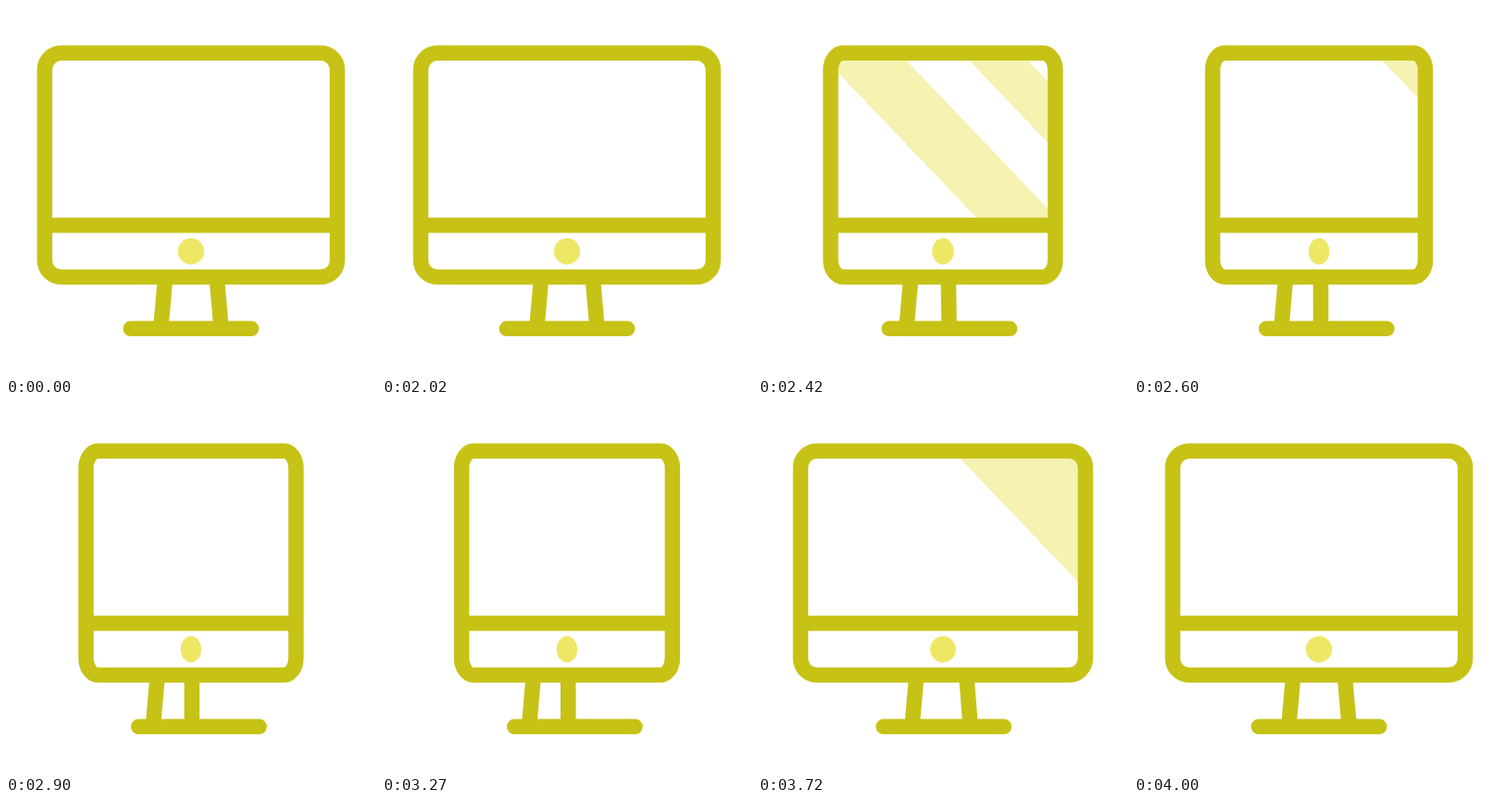
These frames come from a looping animation (400x400 px, 4020 ms). An HTML page without scripts:

```html
<!DOCTYPE html>
<html lang="en">
<head>
<meta charset="utf-8">
<title>Turning monitor</title>
<style>
  /* 0 = facing front, 1 = fully turned */
  @property --turn {
    syntax: "<number>";
    inherits: true;
    initial-value: 0;
  }

  html, body {
    margin: 0;
    height: 100%;
    overflow: hidden;
    background: #fff;
  }

  svg {
    display: block;
    width: 100%;
    height: 100%;
    animation: turn 4020ms infinite;
  }

  .line {
    fill: none;
    stroke: #c7c216;
    stroke-width: 16.5;
  }

  .panel {
    x: calc(41.8px + var(--turn) * 44.7px);
    width: calc(316.4px - var(--turn) * 89.4px);
    rx: calc(18px - var(--turn) * 5px);
    ry: 18px;
  }

  .bar {
    x: calc(41.8px + var(--turn) * 44.7px);
    width: calc(316.4px - var(--turn) * 89.4px);
    fill: #c7c216;
  }

  .button {
    rx: calc(14.2px - var(--turn) * 3px);
    fill: #eee766;
  }

  .left-leg { transform: translateX(calc(var(--turn) * -8.4px)); }
  .right-leg { transform: translateX(calc(var(--turn) * -1.2px)) skewX(calc(var(--turn) * -5deg)); }
  .base { transform: translateX(calc(var(--turn) * 8.5px)); }

  .shine { fill: #f5f2b2; }
  .pair { animation: sweep-pair 4020ms linear infinite; }
  .wide { animation: sweep-wide 4020ms linear infinite; }

  @keyframes turn {
    0% { --turn: 0; }
    49.75% { --turn: 0; animation-timing-function: cubic-bezier(.4, 0, .2, 1); }
    69.15% { --turn: 1; }
    80.1% { --turn: 1; animation-timing-function: cubic-bezier(.4, 0, .2, 1); }
    99.5%, 100% { --turn: 0; }
  }

  @keyframes sweep-pair {
    0%, 50.45% { transform: translateX(-350px); }
    67.16%, 100% { transform: translateX(375px); }
  }

  @keyframes sweep-wide {
    0%, 80.85% { transform: translateX(-290px); }
    95.77%, 100% { transform: translateX(358px); }
  }
</style>
</head>
<body>
<svg viewBox="0 0 400 400">
  <clipPath id="screen">
    <rect class="panel" y="50.8" height="186"/>
  </clipPath>

  <g class="shine" clip-path="url(#screen)">
    <g class="pair">
      <g transform="translate(0 59) skewX(43.68)">
        <rect y="-10" width="86.5" height="190"/>
        <rect x="154.5" y="-10" width="63" height="190"/>
      </g>
    </g>
    <g class="wide">
      <g transform="translate(0 59) skewX(43.68)">
        <rect y="-10" width="158" height="190"/>
      </g>
    </g>
  </g>

  <path class="line left-leg" d="M172.2 293L167.3 349"/>
  <path class="line right-leg" d="M227.8 293L232.7 349"/>
  <path class="line base" d="M134.8 348.8H265.2" stroke-linecap="round"/>

  <rect class="bar" y="228.8" height="16.5"/>
  <rect class="line panel" y="50.8" height="242.2"/>
  <ellipse class="button" cx="200" cy="265.2" ry="14.2"/>
</svg>
</body>
</html>
```
